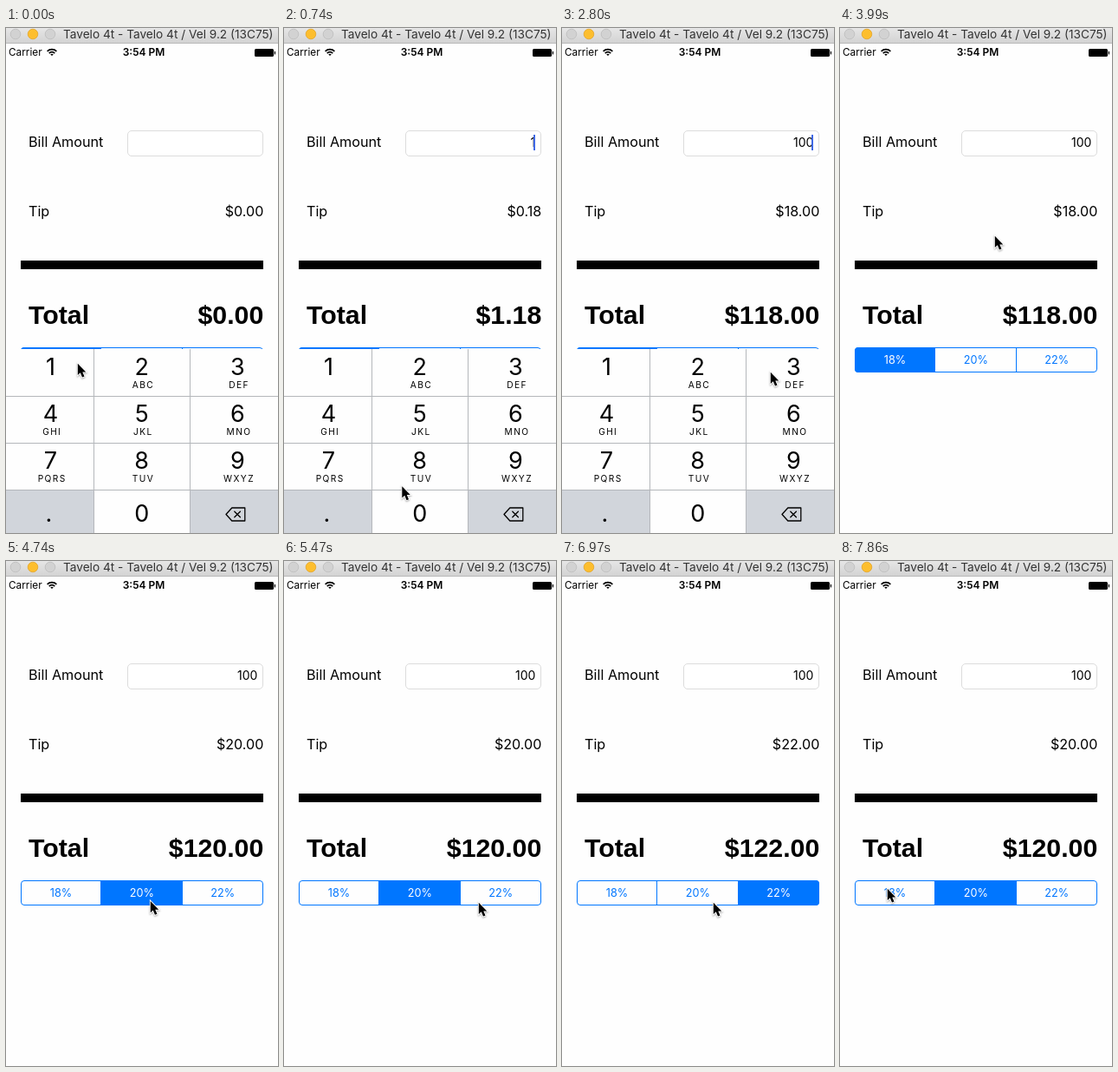
An HTML page with a canvas that plays this animation: 314x582 px, repeating every 8000 ms.

```html
<!DOCTYPE html>
<html lang="en">
<head>
<meta charset="utf-8">
<title>Tip calculator</title>
<style>
html, body { margin: 0; width: 100%; height: 100%; overflow: hidden; background: #fefefe; }
canvas { display: block; width: 314px; height: 582px; }
</style>
</head>
<body>
<canvas id="stage" width="314" height="582"></canvas>
<script>
const c = document.getElementById('stage').getContext('2d');
const LOOP = 8000, STEPS = 54, STEP = LOOP / STEPS;
const SANS = 'Inter, Roboto, sans-serif';
const BOLD = '"Liberation Sans", Arial, sans-serif';
const BLUE = '#0076ff', GREY = '#d1d5db', PAPER = '#fefefe', LINE = '#b4b7bb';
const RATES = [18, 20, 22];
const TRAVEL = 4, CLOSE_AT = 23, CLOSE_TIME = 2.6, KEYBOARD = 212;

// Where the pointer arrives, at which step, and what it taps there.
const stops = [
  { at: 0, x: 82, y: 386 },
  { at: 2, x: 68, y: 390, key: '1' },
  { at: 6, x: 148, y: 553, key: '0' },
  { at: 8, x: 148, y: 553, key: '0' },
  { at: 11, x: 148, y: 553, key: '0' },
  { at: 14, x: 262, y: 560, key: 'del' },
  { at: 19, x: 240, y: 396 },
  { at: CLOSE_AT, x: 182, y: 254 },
  { at: 27, x: 178, y: 239 },
  { at: 31, x: 146, y: 391, pick: 1 },
  { at: 34, x: 223, y: 392 },
  { at: 37, x: 224, y: 393 },
  { at: 39, x: 240, y: 393, pick: 2 },
  { at: 42, x: 175, y: 392 },
  { at: 47, x: 174, y: 393 },
  { at: 48, x: 160, y: 392, pick: 1 },
  { at: 53, x: 54, y: 377 }
];

function ease(u) {
  u = Math.max(0, Math.min(1, u));
  return u * u * (3 - 2 * u);
}

// A tap shows as pressed for one step and takes effect on the next.
function stateAt(k) {
  const state = { bill: '', choice: 0, pressed: null, touched: null };
  for (const { at, key, pick } of stops) {
    if (at === k) {
      state.pressed = key;
      state.touched = pick;
    }
    if (at >= k) break;
    if (key === 'del') state.bill = state.bill.slice(0, -1);
    else if (key) state.bill += key;
    if (pick !== undefined) state.choice = pick;
  }
  return state;
}

function pointerAt(k) {
  const i = Math.max(1, stops.findIndex(s => s.at >= k));
  const a = stops[i - 1], b = stops[i];
  const u = ease(1 - (b.at - k) / Math.min(TRAVEL, b.at - a.at));
  return [a.x + (b.x - a.x) * u, a.y + (b.y - a.y) * u];
}

function rect(x, y, w, h, color) {
  c.fillStyle = color;
  c.fillRect(x, y, w, h);
}

function text(str, x, y, size, opt = {}) {
  const { align = 'left', weight = 400, color = '#000', family = SANS, gap = 0, kerning = 'auto' } = opt;
  c.font = `${weight} ${size}px ${family}`;
  c.letterSpacing = gap + 'px';
  c.fontKerning = kerning;
  c.textAlign = align;
  c.fillStyle = color;
  c.fillText(str, x, y);
}

function path(points, close) {
  c.beginPath();
  points.forEach(([x, y]) => c.lineTo(x, y));
  if (close) c.closePath();
}

function box(x, y, w, h, r) {
  c.beginPath();
  c.roundRect(x, y, w, h, r);
}

function stroke(color, width) {
  c.strokeStyle = color;
  c.lineWidth = width;
  c.stroke();
}

function drawTitleBar() {
  const g = c.createLinearGradient(0, 0, 0, 17);
  g.addColorStop(0, '#e6e6e6');
  g.addColorStop(1, '#d3d3d3');
  rect(0, 0, 314, 17, g);
  rect(0, 17, 314, 1, '#b9b9b9');
  for (let i = 0; i < 3; i++) {
    c.beginPath();
    c.arc(11 + 20 * i, 7, 5.8, 0, 7);
    c.fillStyle = i === 1 ? '#fdbe2e' : '#d2d2d2';
    c.fill();
    stroke(i === 1 ? '#e2a52a' : '#bdbdbd', 0.8);
  }
  text('Tavelo 4t - Tavelo 4t / Vel 9.2 (13C75)', 66, 12, 13.65, { color: '#333' });
}

function drawStatusBar() {
  text('Carrier', 3, 32, 11.8);
  text('3:54 PM', 159, 32, 12, { align: 'center', weight: 600 });
  c.lineCap = 'butt';
  [7.6, 4.6, 1.6].forEach(r => {
    c.beginPath();
    c.arc(53, 32.3, r, -Math.PI * 0.75, -Math.PI * 0.25);
    stroke('#000', 1.7);
  });
  box(287, 24, 22, 9, 1.5);
  c.fillStyle = '#000';
  c.fill();
  rect(309.8, 27, 1.2, 3.4, '#000');
}

function drawForm(k, { bill, choice }) {
  const tip = bill * RATES[choice] / 100;
  const money = n => '$' + n.toFixed(2);
  const heavy = { weight: 700, family: BOLD };
  text('Bill Amount', 26, 137, 16.2);
  box(140.5, 118.5, 156, 29, 4.5);
  c.fillStyle = '#fff';
  c.fill();
  stroke('#dcdcdc', 1);
  text(bill, 290.3, 137, 14, { align: 'right' });
  const blink = k % 7 > 2;
  if (k <= CLOSE_AT && blink) rect(288, 123, 2, 18, '#4069e5');
  text('Tip', 26, 217, 16.2);
  text(money(tip), 297.3, 217, 16.1, { align: 'right' });
  rect(17, 268, 280, 10, '#000');
  text('Total', 26, 341.3, 30.3, heavy);
  text(money(bill * 1 + tip), 297.3, 341.3, 30.3, { ...heavy, align: 'right', kerning: 'none' });
}

function drawSegments({ choice, touched }) {
  const width = 280 / 3, edge = i => Math.floor(16.5 + i * width);
  c.save();
  box(17, 368, 280, 29, 4);
  c.clip();
  RATES.forEach((rate, i) => {
    const x = edge(i), w = edge(i + 1) - x + 1;
    if (i === choice) rect(x, 368, w, 29, BLUE);
    else if (i === touched) rect(x, 368, w, 29, '#d9eaff');
    if (i) rect(x, 368, 1, 29, BLUE);
  });
  c.restore();
  box(17.5, 368.5, 279, 28, 3.5);
  stroke(BLUE, 1);
  RATES.forEach((rate, i) => {
    text(rate + '%', 16.8 + (i + 0.5) * width, 387, 12.7, { align: 'center', color: i === choice ? '#fff' : BLUE });
  });
}

function drawDelete() {
  c.lineJoin = c.lineCap = 'round';
  path([[254, 560.5], [260.8, 553], [275.8, 553], [275.8, 568], [260.8, 568]], true);
  stroke('#000', 1.3);
  [-3.3, 3.3].forEach(d => {
    path([[267.1 - d, 557.2], [267.1 + d, 563.8]]);
    stroke('#000', 1.3);
  });
}

function drawKeyboard(k, { pressed }) {
  const shift = KEYBOARD * ease((k - CLOSE_AT) / CLOSE_TIME);
  if (shift >= KEYBOARD) return;
  const keys = ['1', '2', '3', '4', '5', '6', '7', '8', '9', '.', '0', 'del'];
  const letters = ['', 'ABC', 'DEF', 'GHI', 'JKL', 'MNO', 'PQRS', 'TUV', 'WXYZ'];
  const left = [0, 102, 213], mid = [51.5, 156.7, 267.3];
  c.save();
  c.translate(0, shift);
  keys.forEach((key, i) => {
    const col = i % 3, top = 370 + Math.floor(i / 3) * 54;
    const side = key === '.' || key === 'del';
    rect(left[col], top, 111, 54, side !== (pressed === key) ? GREY : PAPER);
    if (key === 'del') drawDelete();
    else text(key, key === '.' ? 49.5 : mid[col], i > 8 ? 568.5 : top + 29.5, 27, { align: 'center' });
    if (letters[i]) text(letters[i], mid[col] + 1.7, top + 45, 10.2, { align: 'center', gap: 1.4 });
  });
  left.slice(1).forEach(x => rect(x - 1, 370, 1, KEYBOARD, LINE));
  for (let y = 424; y < 582; y += 54) rect(0, y, 314, 1, LINE);
  c.restore();
}

function drawPointer(k) {
  const [x, y] = pointerAt(k);
  c.save();
  c.translate(x + 0.8, y + 0.8);
  c.lineJoin = 'miter';
  path([[0, 0], [0, 13.2], [3, 10.5], [5.2, 15.8], [7.7, 14.8], [5.5, 9.7], [9.5, 9.6]], true);
  c.shadowColor = 'rgba(0,0,0,.35)';
  c.shadowBlur = 2;
  c.shadowOffsetY = 1;
  stroke('#fff', 1.8);
  c.shadowColor = 'transparent';
  c.fillStyle = '#000';
  c.fill();
  c.restore();
}

function draw(t) {
  const k = Math.min(STEPS - 1, Math.floor((t % LOOP + 20) / STEP));
  const state = stateAt(k);
  rect(0, 0, 314, 582, PAPER);
  drawTitleBar();
  drawStatusBar();
  drawForm(k, state);
  drawSegments(state);
  drawKeyboard(k, state);
  drawPointer(k);
}

const start = performance.now();
function tick() {
  draw(performance.now() - start);
  requestAnimationFrame(tick);
}
tick();
</script>
</body>
</html>
```
